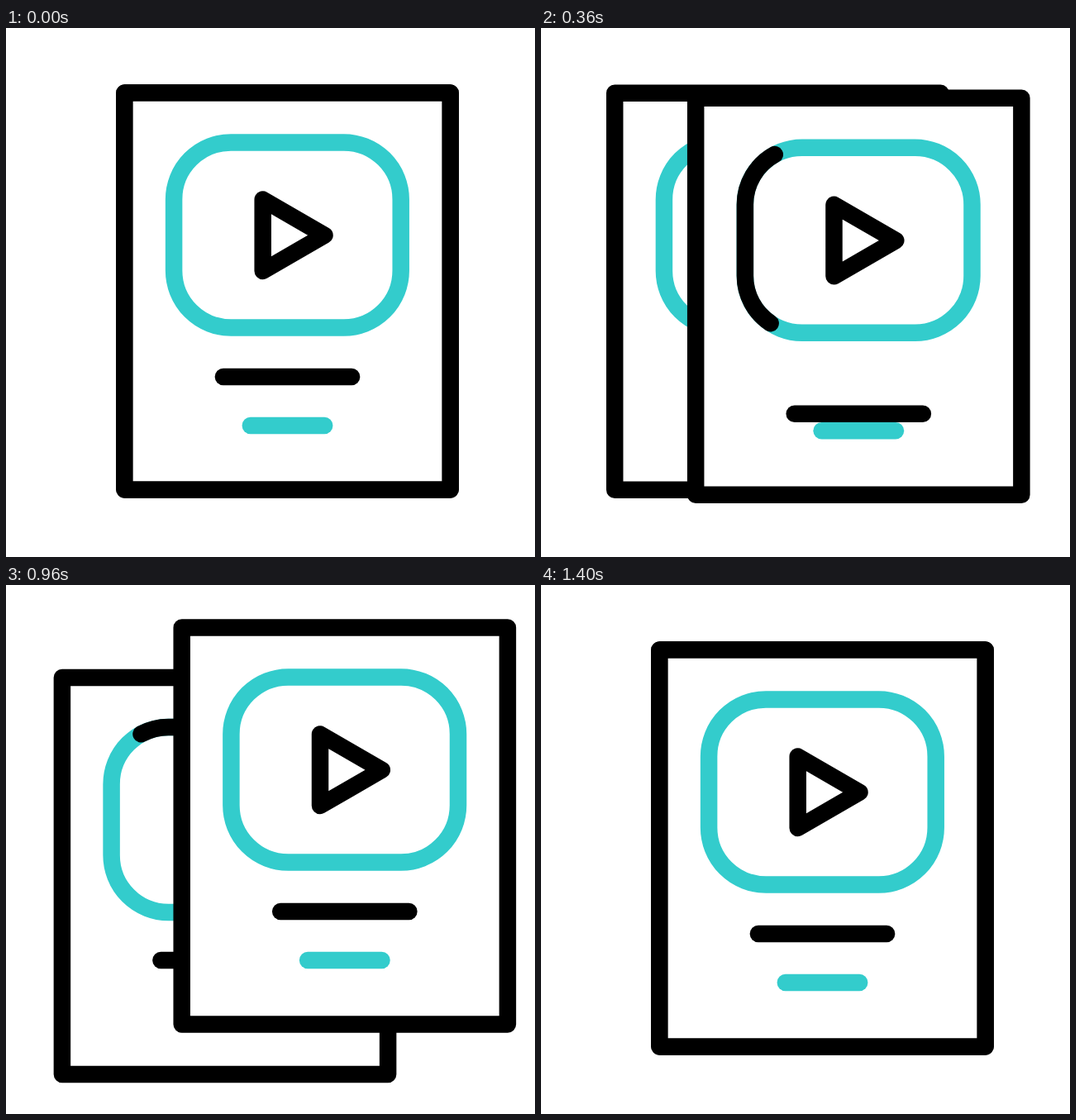
An HTML page without scripts for the animation above (1.48 s loop, 640 px wide and 640 px high).

```html
<!DOCTYPE html>
<html lang="en">
<head>
<meta charset="utf-8">
<title>Video cards</title>
<style>
  /* --k counts the 40 ms ticks of the loop; every pose is computed from it. */
  @property --k { syntax: "<number>"; inherits: true; initial-value: 0; }
  @keyframes tick { to { --k: 37; } }

  html, body { margin: 0; width: 100%; height: 100%; overflow: hidden; background: #fff; }
  :root { animation: tick 1480ms steps(37) -2ms infinite; }
  svg { display: block; width: 100%; height: 100%; }

  .sheet * {
    fill: none;
    stroke: #000;
    stroke-width: 20.5px;
    stroke-linecap: round;
    stroke-linejoin: round;
  }
  .sheet .paper { fill: #fff; }
  .sheet .teal { stroke: #33cccc; }

  /* Cards fan out along a bent path in two eased legs, then slide straight home. */
  .card {
    --n: calc(var(--k) - var(--lag));
    --a: clamp(0, (var(--k) - 2) / 4, 1);
    --b: clamp(0, (var(--k) - 6) / 6, 1);
    --c: clamp(0, (var(--k) - 26) / 9, 1);
    --leg1: calc(var(--a) * var(--a) * (3 - 2 * var(--a)));
    --leg2: calc(var(--b) * var(--b) * (3 - 2 * var(--b)));
    --home: calc(var(--c) * var(--c) * (3 - 2 * var(--c)));
    offset-rotate: 0deg;
    offset-distance: calc(var(--leg1) * var(--len1) + var(--leg2) * var(--len2));
    translate: calc(var(--home) * var(--dx)) calc(var(--home) * var(--dy));
  }
  .back {
    --lag: 5; --rest: 1.5;
    --len1: 44.9px; --len2: 79.6px; --dx: 75.5px; --dy: -33.5px;
    offset-path: path("M0 0C-4.8 -5 -15 -37 -28.9 -29.8C-41.5 -24.2 -67.7 22.9 -75.5 33.5");
  }
  .front {
    --lag: 0; --rest: 0;
    --len1: 43.9px; --len2: 84.4px; --dx: -69.3px; --dy: 27px;
    offset-path: path("M0 0C2.6 6.1 1.2 42.5 15.2 36.6C26.8 32.1 59.3 -15.4 69.3 -27");
  }

  /* Play button shrinks and recovers at constant line weight. */
  .play {
    --p: clamp(0, 1 - abs(var(--k) - 6) / 4, 1);
    --press: calc(var(--p) * var(--p) * (3 - 2 * var(--p)));
    vector-effect: non-scaling-stroke;
    transform-box: fill-box;
    transform-origin: center;
    transform: scale(calc(1 - .2 * var(--press)), calc(1 - .173 * var(--press)));
  }

  /* The black outline draws itself, then is erased from its start. */
  .trace {
    --p: clamp(0, (var(--n) - 5) / 12, 1);
    --q: clamp(0, (var(--n) - 12) / 11, 1);
    --head: calc(var(--p) * var(--p) * (3 - 2 * var(--p)));
    --tail: calc(var(--q) * var(--q) * (3 - 2 * var(--q)));
    stroke-dasharray: calc((var(--head) - var(--tail)) * 100px) 200px;
    stroke-dashoffset: calc(var(--tail) * -100px);
    opacity: calc((var(--head) - var(--tail)) * 1000);
  }

  /* The title drops onto the caption, knocks it down, and is knocked back up. */
  .title {
    --p: clamp(0, (var(--n) - 6) / 3, 1);
    --q: clamp(0, (var(--n) - 16.25) / 2.75, 1);
    --drop: calc(var(--p) * var(--p) * (3 - 2 * var(--p)));
    --rise: calc(var(--q) * var(--q) * (3 - 2 * var(--q)));
    transform: translateY(calc((38.4 * var(--drop) - (38.4 + var(--rest)) * var(--rise)) * 1px));
  }
  .caption {
    --p: clamp(0, (var(--n) - 9) / 3, 1);
    --q: clamp(0, (var(--n) - 12) / 4, 1);
    --down: calc(var(--p) * var(--p) * (3 - 2 * var(--p)));
    --up: calc(var(--q) * var(--q) * (3 - 2 * var(--q)));
    transform: translateY(calc((var(--down) - var(--up)) * 35.5px));
  }
</style>
</head>
<body>
<svg viewBox="0 0 640 640">
  <defs>
    <g id="sheet" class="sheet">
      <rect class="paper" x="143.4" y="78.5" width="394.2" height="480.1"/>
      <rect class="teal" x="203.1" y="138.4" width="274.6" height="224.1" rx="69"/>
      <path class="trace" pathLength="100" d="M239 146.8A69 69 0 0 0 203.1 207.4v86.1a69 69 0 0 0 69 69h136.6a69 69 0 0 0 69 -69v-86.1a69 69 0 0 0 -69 -69h-136.6A69 69 0 0 0 239 146.8"/>
      <path class="play" d="M310.7 207.5V294L385.5 250.75Z"/>
      <path class="caption teal" d="M295.8 481H385.2"/>
      <path class="title" d="M262.9 422.1H418.1"/>
    </g>
  </defs>
  <g class="card back"><use href="#sheet"/></g>
  <g class="card front"><use href="#sheet"/></g>
</svg>
</body>
</html>
```
